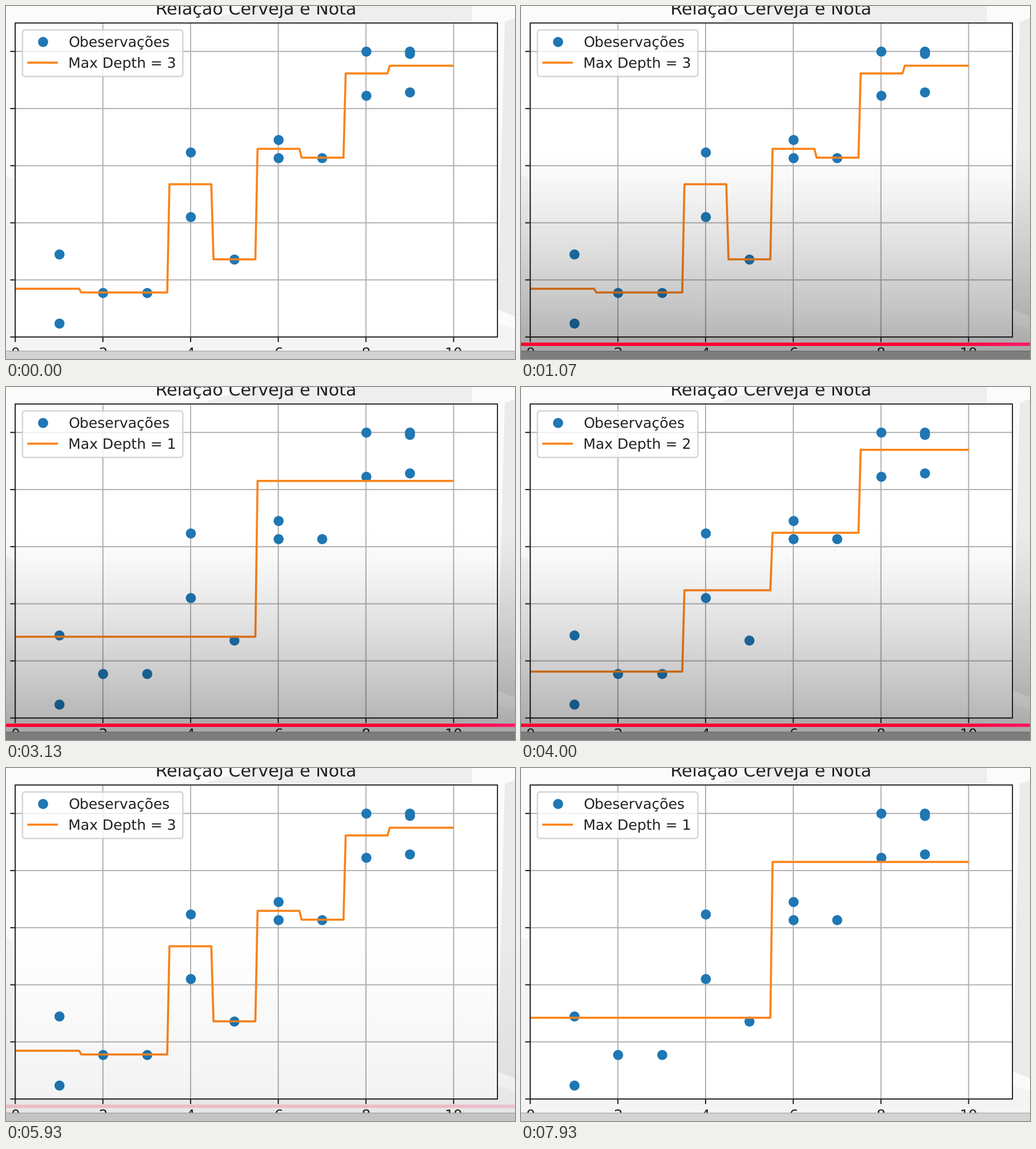
These frames come from a looping animation (899 by 623 pixels, 8000 ms). A matplotlib script:

```python
import numpy as np
import matplotlib.pyplot as plt
from matplotlib.animation import FuncAnimation
from matplotlib.patches import FancyBboxPatch, Polygon, Rectangle

W, H = 899, 623
LOOP, STEP = 8000, 64
PX = 0.72                      # points per pixel at 100 dpi
PT = 2.53                      # pixels per point of the enlarged chart
BLUE, ORANGE, INK, GRID = "#1f77b4", "#fb831a", "#202020", "#b2b2b2"
LEFT, RIGHT, TOP, BOTTOM = 16.3, 868, 30, 584.2
STRIP = 609

# beers drunk and the score given
beers = np.array([1, 1, 2, 3, 4, 4, 5, 6, 6, 7, 8, 8, 9, 9, 9])
scores = np.array([1.45, .24, .78, .78, 3.24, 2.11, 1.36, 3.45, 3.14, 3.14,
                   5, 4.23, 5, 4.96, 4.29])

plt.rcParams.update({"font.family": "DejaVu Sans", "path.snap": False,
                     "text.hinting": "none"})
fig = plt.figure(figsize=(W / 100, H / 100), dpi=100, facecolor="#fbfbfb")
ax = fig.add_axes([0, 0, 1, 1])
ax.axis("off")


def to_x(v):
    return LEFT + 77.43 * np.asarray(v)


def to_y(v):
    return BOTTOM - 100.8 * np.asarray(v)


def fit_tree(x, y, depth):
    """Regression tree: return the cuts and the level of each leaf."""
    cuts = (np.unique(x)[1:] + np.unique(x)[:-1]) / 2
    if depth == 0 or not len(cuts):
        return [], [y.mean()]

    def loss(cut):
        return sum(len(part) * part.var() for part in (y[x < cut], y[x > cut]))

    cut = min(cuts, key=loss)
    low, high = x < cut, x > cut
    left_cuts, left = fit_tree(x[low], y[low], depth - 1)
    right_cuts, right = fit_tree(x[high], y[high], depth - 1)
    return left_cuts + [cut] + right_cuts, left + right


def predict(grid, depth):
    cuts, levels = fit_tree(beers, scores, depth)
    return np.array(levels)[np.searchsorted(cuts, grid)]


def stroke(xs, ys, color, points, z, cap="butt"):
    return ax.plot(xs, ys, color=color, lw=points * PT * PX, zorder=z,
                   solid_capstyle=cap)[0]


def dots(xs, ys, z):
    ax.plot(xs, ys, "o", ms=6 * PT * PX, mew=PT * PX, color=BLUE, zorder=z)


def label(x, y, text, points=10, z=8, **kw):
    return ax.text(x, y, text, fontsize=points * PT * PX, color=INK, zorder=z, **kw)


def shade(pts, color):
    ax.add_patch(Polygon(pts, fc=color, ec="none", zorder=0))


def ramp(u, power=1.0):
    return np.clip(u, 0, 1) ** power


# soft backdrop
shade([(0, 300), (0, H), (W, H), (W, 570)], "#f4f4f4")
shade([(340, 30), (440, 0), (823, 0), (823, 30)], "#eeeeee")
shade([(881, 28), (W, 21), (W, 548), (868, 535)], "#ebebeb")

# plot area
box = (LEFT, TOP), RIGHT - LEFT, BOTTOM - TOP
ax.add_patch(Rectangle(*box, fc="white", ec="none", zorder=1))
ax.add_patch(Rectangle(*box, fill=False, ec=INK, lw=0.75 * PT * PX, zorder=6))
for v in range(0, 11, 2):
    x = to_x(v)
    stroke([x, x], [TOP, BOTTOM], GRID, 0.8, 2)
    stroke([x, x], [BOTTOM, BOTTOM + 3.5 * PT], INK, 0.8, 6)
    label(x, BOTTOM + 7 * PT, str(v), ha="center", va="top", z=6)
for v in range(6):
    y = to_y(v)
    stroke([LEFT, RIGHT], [y, y], GRID, 0.8, 2)
    stroke([LEFT - 3.5 * PT, LEFT], [y, y], INK, 0.8, 6)
label((LEFT + RIGHT) / 2 - 0.7, TOP - 6 * PT, "Relação Cerveja e Nota", 12,
      ha="center")

dots(to_x(beers), to_y(scores), 3)
curve = stroke([], [], ORANGE, 1.45, 4)

# legend
ax.add_patch(FancyBboxPatch((29, 42.3), 283.3, 82,
                            boxstyle="round,pad=0,rounding_size=5",
                            fc=(1, 1, 1, 0.8), ec=(0.8, 0.8, 0.8, 0.8),
                            lw=PT * PX, zorder=7))
dots([64.5], [63.2], 8)
stroke([39.5, 89.8], [100, 100], ORANGE, 1.45, 8, "projecting")
label(110.3, 72, "Obeservações")
depth_text = label(110.3, 109, "")

# strip under the video
ax.add_patch(Rectangle((0, STRIP), W, H - STRIP, fc="#d3d3d3", ec="none", zorder=9))
stroke([0, W], [STRIP, STRIP], "#a9a9a9", 0.5, 9)

# player controls: shadow and progress bar
rows = np.arange(H) + 0.5
shadow = np.zeros((H, 1, 4))
shadow[:, 0, 3] = np.where(rows < STRIP, 0.33 * ramp((rows - 245) / 378, 1.3), 0.405)
veil = ax.imshow(shadow, extent=(0, W, H, 0), zorder=10, interpolation="nearest")

mix = ramp(np.linspace(-4, 1, 400))[None, :, None]
red, pink = np.array([1, 0, 0.2]), np.array([1, 0.15, 0.5])
bar = ax.imshow(red + (pink - red) * mix, zorder=11, interpolation="bilinear")
ax.set_aspect("auto")


def controls(t):
    shown = 1 - (1 - ramp((t - 70) / 270)) ** 2
    return float(shown * (1 - ramp((t - 5700) / 230)))


grid = np.linspace(0, 10, 200)


def update(i):
    t = i * STEP
    depth = 1 + (t - 1133) // 2000 % 3
    curve.set_data(to_x(grid), to_y(predict(grid, depth)))
    depth_text.set_text(f"Max Depth = {depth}")
    for part in (veil, bar):
        part.set_alpha(controls(t))
    bar.set_extent((0, 945 + 4 * t / 1000, 600.5, 594.8))
    ax.set_xlim(0, W)
    ax.set_ylim(H, 0)
    return curve, depth_text, veil, bar


anim = FuncAnimation(fig, update, frames=LOOP // STEP, interval=STEP,
                     repeat=True, repeat_delay=0, blit=False)
plt.show()
```
